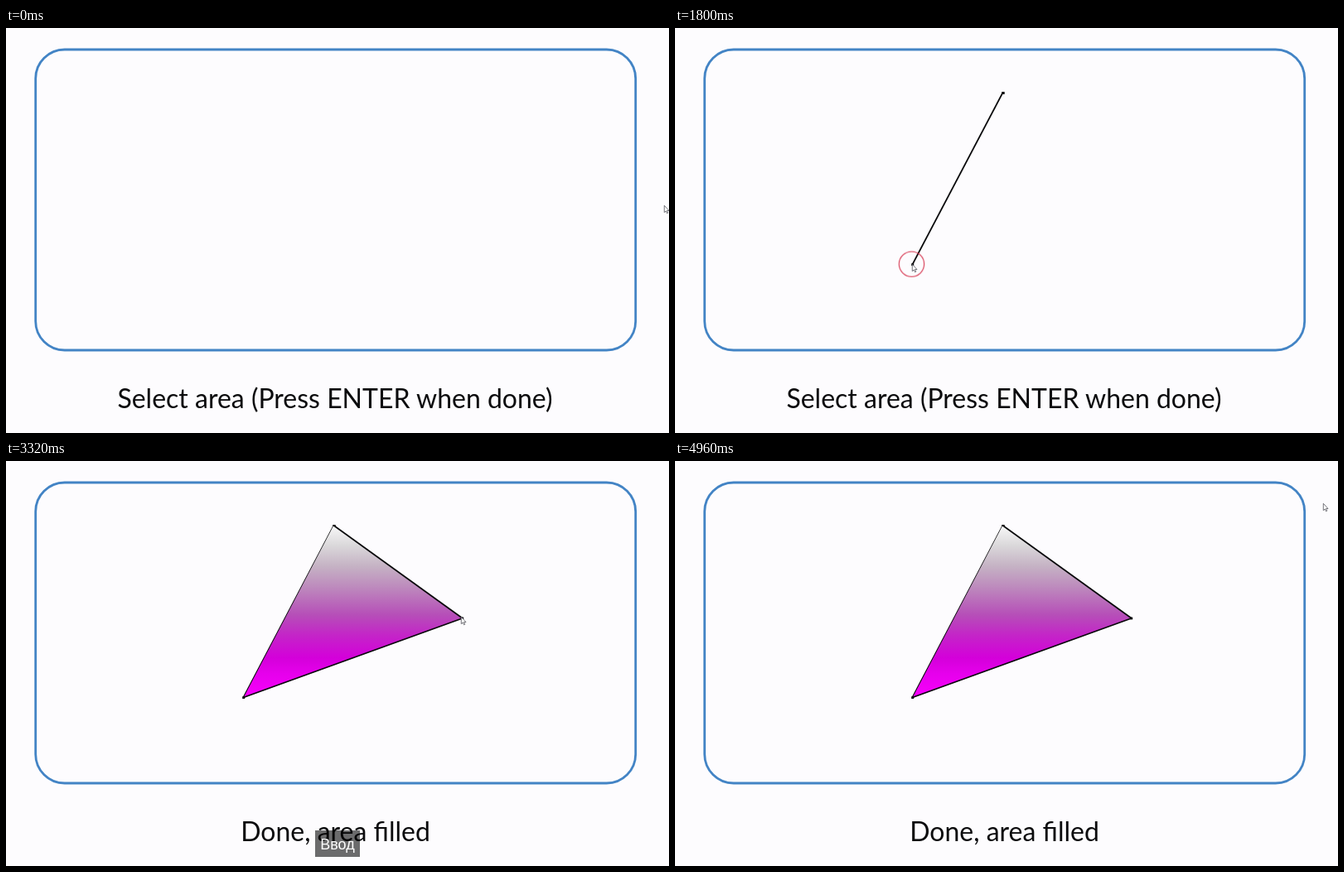
An HTML page that plays this animation: 800 px wide and 489 px high, repeating every 5000 ms.

```html
<!DOCTYPE html>
<html lang="en">
<head>
<meta charset="utf-8">
<title>Select area</title>
<style>
html, body { margin: 0; width: 100%; height: 100%; overflow: hidden; background: #fdfcfe; }
svg { display: block; width: 800px; height: 489px; }

.caption { font: 32px Lato, Carlito, sans-serif; text-anchor: middle; fill: #0b0b0d; }
.lines { fill: none; stroke: #08080a; stroke-width: 1.7; }
.step { opacity: 0; animation: 5s step-end infinite; }
.first { animation-name: first; }
.second { animation-name: second; }
.third { animation-name: third; }
.done { animation-name: done; }
.prompt { animation: prompt 5s step-end infinite; }
.key { opacity: 0; animation: key 5s linear infinite; }
.key text { font: 18px "Liberation Sans", Arial, sans-serif; text-anchor: middle; fill: #fff; }

.ring {
  fill: none; stroke: #d5304a; stroke-width: 1.1; vector-effect: non-scaling-stroke;
  opacity: 0; animation: ring 5s linear infinite;
}
.cursor {
  fill: #fff; stroke: #55555c; stroke-width: .8;
  animation: move 5s ease-in-out infinite;
}

@keyframes first { 17.2%, 100% { opacity: 1; } }
@keyframes second { 30.5%, 100% { opacity: 1; } }
@keyframes third { 46.4%, 100% { opacity: 1; } }
@keyframes done { 57.6%, 100% { opacity: 1; } }
@keyframes prompt { 0% { opacity: 1; } 57.6%, 100% { opacity: 0; } }
@keyframes key {
  0%, 53.6% { opacity: 0; }
  54.4%, 66.4% { opacity: 1; }
  70.4%, 100% { opacity: 0; }
}
/* Each click starts this cycle through its own delay. */
@keyframes ring {
  0% { transform: scale(4); opacity: 1; }
  7.9% { transform: scale(20); opacity: 1; }
  8%, 100% { transform: scale(20); opacity: 0; }
}
@keyframes move {
  0%, .4% { transform: translate(794px, 214px); animation-timing-function: cubic-bezier(.35, .1, .45, 1); }
  13.6% { transform: translate(404px, 95px); }
  16.8%, 20% { transform: translate(396px, 78px); }
  30%, 36.8% { transform: translate(286px, 285px); }
  46%, 82.4% { transform: translate(549px, 188px); animation-timing-function: ease-in; }
  88.8% { transform: translate(594px, 209px); animation-timing-function: cubic-bezier(.4, .3, .5, 1); }
  99.2%, 100% { transform: translate(782px, 51px); }
}
</style>
</head>
<body>
<svg viewBox="0 0 800 489">
  <defs>
    <linearGradient id="paint" gradientUnits="userSpaceOnUse" x1="0" y1="77" x2="0" y2="286">
      <stop offset="0" stop-color="#f9f9f9"/>
      <stop offset=".12" stop-color="#dad8da"/>
      <stop offset=".24" stop-color="#c5b2c4"/>
      <stop offset=".36" stop-color="#bd8abd"/>
      <stop offset=".52" stop-color="#b64fb8"/>
      <stop offset=".64" stop-color="#c424c8"/>
      <stop offset=".77" stop-color="#d400da"/>
      <stop offset=".86" stop-color="#e600ec"/>
      <stop offset="1" stop-color="#f800fc"/>
    </linearGradient>
  </defs>

  <rect x="35.7" y="26" width="724" height="363" rx="35" fill="none" stroke="#4384c5" stroke-width="2.8"/>

  <text class="caption prompt" x="397" y="458.5">Select area (Press ENTER when done)</text>
  <text class="caption step done" x="397.5" y="458.5">Done, area filled</text>

  <g class="lines">
    <path class="step first" d="M394.3 78.5h3.4" stroke-width="3"/>
    <path class="step second" d="M395.5 78L286.5 285.5"/>
  </g>
  <path class="step done" d="M395.5 77.5L551 190 286.5 286Z" fill="url(#paint)"/>
  <g class="lines">
    <path class="step second" d="M285.2 285.7h3" stroke-width="2.8"/>
    <path class="step third" d="M286.5 285.5L550.5 190"/>
    <path class="step third" d="M549.2 190h3" stroke-width="2.8"/>
    <path class="step done" d="M395 77.5L551 190"/>
  </g>

  <g class="key">
    <rect x="373" y="446" width="54" height="32" fill="#000" fill-opacity=".58"/>
    <text x="400" y="468.5">Ввод</text>
  </g>

  <g transform="translate(396 78)"><circle class="ring" r="1" style="animation-delay: -4140ms"/></g>
  <g transform="translate(285.5 285)"><circle class="ring" r="1" style="animation-delay: -3475ms"/></g>
  <g transform="translate(549 189)"><circle class="ring" r="1" style="animation-delay: -2680ms"/></g>

  <path class="cursor" d="M.3 .3V8.7L2.2 7 3.5 9.8 4.8 9.2 3.6 6.5H6Z"/>
</svg>
</body>
</html>
```
